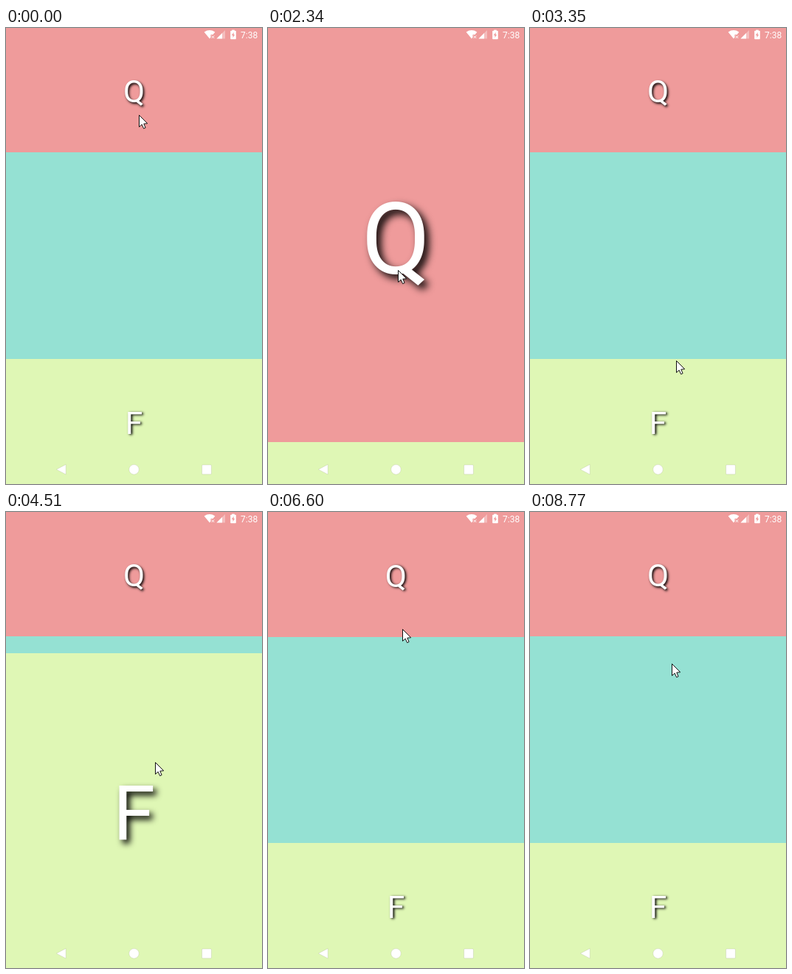
Recreate the animation shown at these times as an HTML page with a canvas. Size 347 px wide and 620 px high, loop 8.85 s.

```html
<!DOCTYPE html>
<html lang="en">
<head>
<meta charset="utf-8">
<title>Sliding panels</title>
<style>
  html, body { margin: 0; width: 100%; height: 100%; overflow: hidden; }
  canvas { display: block; }
</style>
</head>
<body>
<canvas id="stage" width="347" height="620"></canvas>
<script>
const W = 347, H = 620, LOOP = 8850, STEPS = 114;
const RED_REST = 169, LIME_REST = 450;
const RED = '#ef9b9b', TEAL = '#95e1d3', LIME = '#dff7b5';
const ctx = document.getElementById('stage').getContext('2d');

// Smooth progress from 0 to 1 between two steps.
function ease(step, from, to) {
  const k = Math.min(1, Math.max(0, (step - from) / (to - from)));
  return k * k * (3 - 2 * k);
}

// A panel is pulled out between steps a and b and goes back between c and d.
const pull = (step, reach, a, b, c, d) => reach * (ease(step, a, b) - ease(step, c, d));

const redBottom = step => RED_REST
  + pull(step, 394, 10, 28, 30, 37)
  + pull(step, 130, 84.8, 89, 90, 94);

const limeTop = step => LIME_REST
  - pull(step, 322, 46, 62.8, 67, 74.7)
  - pull(step, 99, 100, 104, 107, 110);

// Pointer moves: first step, last step, x, y reached.
const moves = [
  [3, 5, 181, 117],
  [10, 28, 176, 329],
  [30, 37, 194, 150],
  [37, 44.9, 199, 504],
  [46, 62.8, 203, 299],
  [65, 72, 198, 432],
  [72, 80, 182, 159],
  [85, 89, 183, 229],
  [90, 94, 182, 150],
  [94, 99, 200, 505],
  [100, 104, 200, 445],
  [107, 113, 192, 206]
];

function pointer(step) {
  return moves.reduce(([px, py], [from, to, x, y]) => {
    const k = ease(step, from, to);
    return [px + (x - px) * k, py + (y - py) * k];
  }, [180, 118]);
}

function poly(points, fill, stroke) {
  ctx.beginPath();
  points.forEach(([x, y]) => ctx.lineTo(x, y));
  ctx.closePath();
  ctx.fillStyle = fill;
  ctx.fill();
  if (stroke) { ctx.strokeStyle = stroke; ctx.stroke(); }
}

// The letter and its shadow grow with the panel.
function panel(top, bottom, color, letter) {
  const h = bottom - top, size = 2.5 + h * 0.236;
  ctx.fillStyle = color;
  ctx.fillRect(0, top, W, h);
  ctx.save();
  ctx.font = `${size}px Roboto, sans-serif`;
  ctx.textAlign = 'center';
  ctx.fillStyle = '#fff';
  ctx.shadowColor = '#000';
  ctx.shadowOffsetX = ctx.shadowOffsetY = size * 0.045;
  ctx.shadowBlur = size * 0.08;
  ctx.fillText(letter, W / 2, top + h / 2 + size * 0.388);
  ctx.restore();
}

function statusBar() {
  ctx.fillStyle = ctx.strokeStyle = '#fff';
  ctx.lineWidth = 1;
  ctx.beginPath();
  ctx.moveTo(276, 14.5);
  ctx.lineTo(268.6, 5.4);
  ctx.quadraticCurveTo(276, 0.6, 283.4, 5.4);
  ctx.lineTo(280.5, 9);
  ctx.lineTo(277.5, 9);
  ctx.lineTo(277.5, 12.7);
  ctx.fill();
  ctx.beginPath();
  ctx.moveTo(278.7, 10.4); ctx.lineTo(282.3, 14);
  ctx.moveTo(282.3, 10.4); ctx.lineTo(278.7, 14);
  ctx.stroke();

  poly([[285.5, 14.5], [297, 3], [297, 14.5]], 'rgba(255,255,255,.35)');
  poly([[285.5, 14.5], [293, 7], [293, 14.5]], '#fff');

  ctx.fillRect(306.2, 2.6, 3.6, 2);
  ctx.beginPath();
  ctx.roundRect(304.2, 3.8, 7.6, 11.4, 0.8);
  ctx.fill();
  poly([[308.6, 5.8], [305.9, 10], [307.5, 10], [307.5, 13.2], [310.1, 9], [308.6, 9]], RED);

  ctx.fillStyle = '#fff';
  ctx.font = '12px Roboto, sans-serif';
  ctx.fillText('7:38', 318, 13.8);
}

function navBar() {
  ctx.lineWidth = 1;
  ctx.lineJoin = 'round';
  poly([[68.3, 600.2], [81.2, 593.4], [81.2, 607]], '#fff', 'rgba(120,120,100,.16)');
  ctx.beginPath();
  ctx.arc(173.5, 600.3, 6.7, 0, 7);
  ctx.fill();
  ctx.stroke();
  ctx.beginPath();
  ctx.roundRect(265.6, 594, 12.8, 12.8, 1);
  ctx.fill();
  ctx.stroke();
}

function cursor([x, y]) {
  const arrow = [[0, 0], [0, 16], [3.7, 12.7], [6.1, 18.2], [8.6, 17.1], [6.3, 11.7], [11.2, 11.3]];
  ctx.lineWidth = 1;
  ctx.lineJoin = 'miter';
  ctx.miterLimit = 2;
  poly(arrow.map(([dx, dy]) => [Math.round(x) + dx + 0.5, Math.round(y) + dy + 0.5]), '#fff', '#111');
}

function draw(time) {
  const step = Math.floor((time % LOOP) / LOOP * STEPS + 0.04);
  const bottom = Math.round(redBottom(step)), top = Math.round(limeTop(step));
  const red = () => panel(0, bottom, RED, 'Q');
  const lime = () => panel(top, H, LIME, 'F');
  ctx.fillStyle = TEAL;
  ctx.fillRect(0, 0, W, H);
  // The panel being pulled lies on top.
  (top < LIME_REST ? [red, lime] : [lime, red]).forEach(paint => paint());
  statusBar();
  navBar();
  cursor(pointer(step));
}

const start = performance.now();
function tick() {
  draw(performance.now() - start);
  requestAnimationFrame(tick);
}
tick();
</script>
</body>
</html>
```
